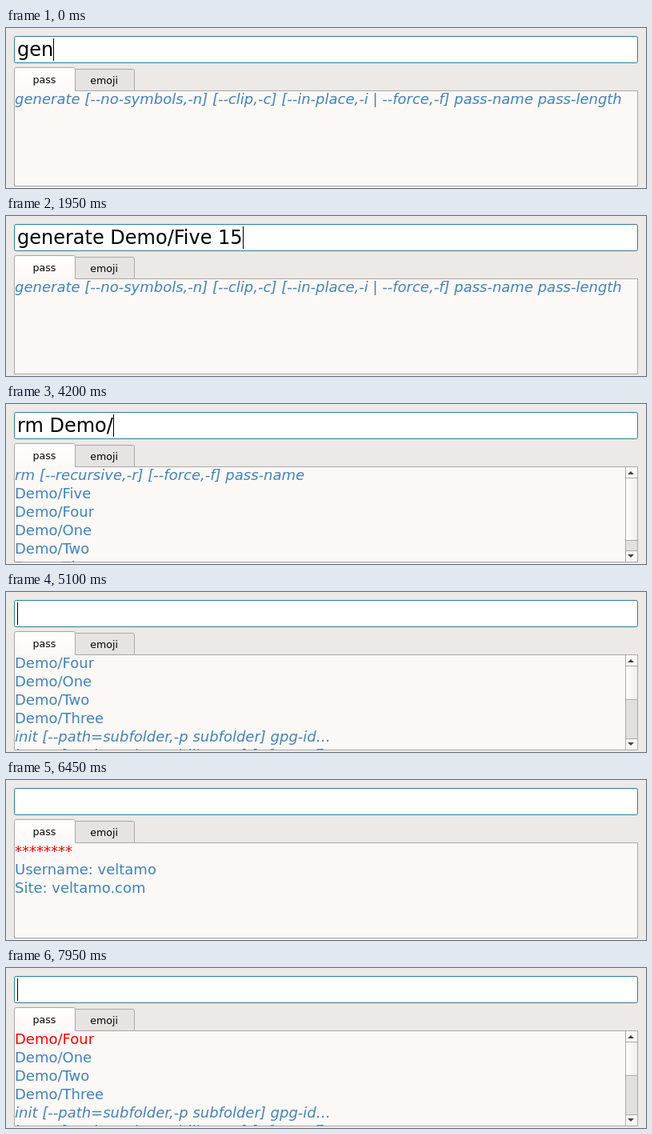
Animation of 800x200 px, one loop 8000 ms. Source, as an HTML page:

```html
<!DOCTYPE html>
<html lang="en">
<head>
<meta charset="utf-8">
<style>
html, body { margin: 0; width: 100%; height: 100%; overflow: hidden; background: #ede9e6; }
svg { display: block; width: 800px; height: 200px; font-family: "DejaVu Sans", sans-serif; }
text { white-space: pre; }
#rows { font-size: 18px; fill: #4183bb; }
#rows .usage { font-style: italic; }
#rows .on { fill: #f00; }
#typed { font-size: 24px; }
.tab { font-size: 12.6px; text-anchor: middle; }
.edge { stroke: #aba7a4; }
</style>
</head>
<body>
<svg viewBox="0 0 800 200">
  <defs>
    <clipPath id="view"><rect x="11" y="79" width="778" height="118.5"/></clipPath>
    <linearGradient id="active" x2="0" y2="1">
      <stop stop-color="#fff"/><stop offset="1" stop-color="#fcf8f6"/>
    </linearGradient>
    <linearGradient id="grip"><stop stop-color="#fff"/><stop offset="1" stop-color="#f0eeec"/></linearGradient>
  </defs>

  <rect x="10.5" y="10.5" width="779" height="33" rx="2" fill="#fff" stroke="#2f7ca3"/>
  <text id="typed" x="14" y="35"></text>
  <rect id="caret" y="13" width="1" height="28"/>

  <path class="edge" fill="#e6e4e2" d="M86.5 78.5V51.5H158.500q2 0 2 2V78.500"/>
  <rect class="edge" x="10.500" y="78.500" width="779" height="119" fill="#fcf8f6"/>
  <path class="edge" fill="url(#active)" d="M10.500 80V51.500q0-2 2-2H84.500q2 0 2 2V78.500"/>
  <rect x="11" y="77" width="75" height="4" fill="#fcf8f6"/>
  <text class="tab" x="48" y="69">pass</text>
  <text class="tab" x="122.700" y="70">emoji</text>

  <g id="rows" clip-path="url(#view)"></g>
  <g id="bar">
    <rect class="edge" x="774.500" y="78.500" width="15" height="119" fill="#e2e0de"/>
    <path class="edge" fill="#faf8f6" d="M774.500 78.500h15v14h-15zM774.500 183.500h15v14h-15z"/>
    <rect id="thumb" class="edge" x="774.500" y="92.500" width="15" fill="url(#grip)"/>
    <path fill="#444" d="M777 88l4-4 4 4zM777 188l4 4 4-4z"/>
  </g>
</svg>
<script>
const LOOP = 8000, STEP = 150, ROW = 23, VIEW = 118, TRACK = 91;
const GENERATED = 2200, REMOVED = 4680, OPENED = 6150, CLOSED = 7500;
const $ = id => document.getElementById(id);

const before = ["Four", "One", "Two", "Three"].map(n => "Demo/" + n);
const after = ["Demo/Five", ...before];
const usages = [
  "init [--path=subfolder,-p subfolder] gpg-id…",
  "insert [--echo,-e | --multiline,-m] [--force,-f] pass-name",
  "generate [--no-symbols,-n] [--clip,-c] [--in-place,-i | --force,-f] pass-name pass-length",
  "rm [--recursive,-r] [--force,-f] pass-name",
  "mv [--force,-f] old-path new-path",
  "cp [--force,-f] old-path new-path",
  "git git-command-args…"
];
const details = ["********", "Username: veltamo", "Site: veltamo.com"];

// Command usage, followed by the entries that fit its argument
function complete(typed, entries) {
  const [command, arg] = typed.split(" ");
  const usage = usages.filter(u => u.startsWith(command));
  return arg === undefined ? usage : [...usage, ...entries.filter(e => e.startsWith(arg))];
}

function typing(command, count, entries) {
  const typed = command.slice(0, Math.max(0, Math.floor(count)));
  return { typed, rows: complete(typed, entries), selected: -1 };
}

const idle = (rows, selected) => ({ typed: "", rows, selected });

function stateAt(t) {
  if (t < GENERATED) return typing("generate Demo/Five 15", 3 + t / 105, before);
  if (t < 3400) return idle([...after, ...usages], t < 2550 ? -1 : t < 2850 ? 0 : 1);
  if (t < REMOVED) return typing("rm Demo/Five", 1 + (t - 3400) / 108, after);
  if (t >= OPENED && t < CLOSED) return idle(details, Math.min(2, Math.floor((t - 6450) / 300)));
  return idle([...before, ...usages], t < 5400 ? -1 : 0);
}

function caretOn(t, typed) {
  if (typed) return true;
  const since = t - (t < REMOVED ? GENERATED : REMOVED);
  return since % 1000 < 500;
}

function rowText(label, i, selected) {
  const style = (usages.includes(label) ? "usage " : "") + (i === selected ? "on" : "");
  return `<text class="${style}" x="11" y="${95 + i * ROW}">${label}</text>`;
}

function draw(t) {
  const { typed, rows, selected } = stateAt(t);
  $("typed").textContent = typed;
  $("caret").setAttribute("x", 14 + Math.round($("typed").getComputedTextLength()));
  $("caret").style.display = caretOn(t, typed) ? "" : "none";
  $("rows").innerHTML = rows.slice(0, 6).map((r, i) => rowText(r, i, selected)).join("");
  const height = rows.length * ROW;
  $("bar").style.display = height > VIEW ? "" : "none";
  $("thumb").setAttribute("height", Math.min(TRACK, Math.round(TRACK * VIEW / height)));
}

const start = performance.now();
let shown = -1;
function frame() {
  const t = Math.floor((performance.now() - start) % LOOP / STEP) * STEP;
  if (t !== shown) draw(shown = t);
  requestAnimationFrame(frame);
}
frame();
</script>
</body>
</html>
```
